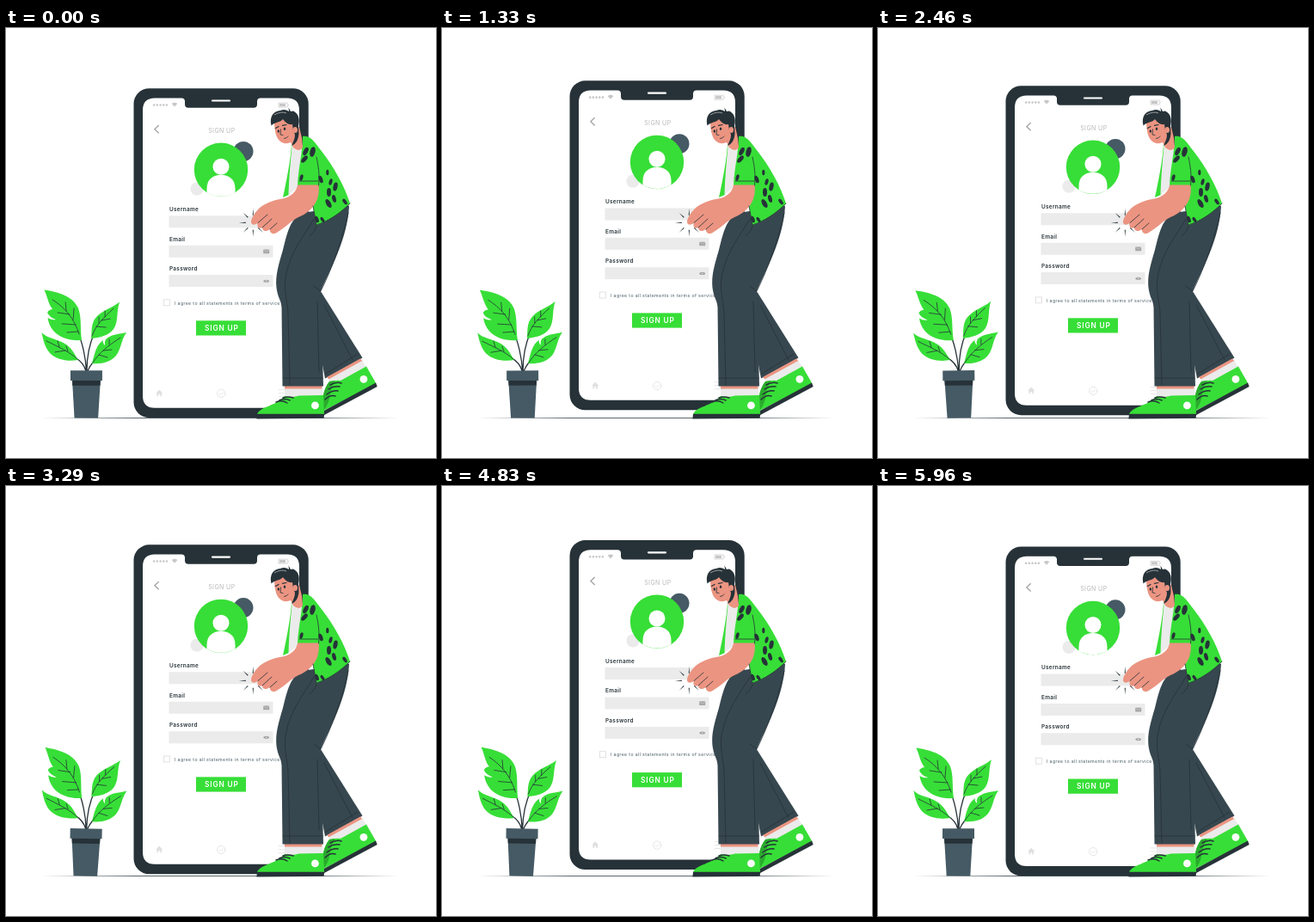
These frames come from a looping animation (500x500 px, 6000 ms). An HTML page:

```html
<!DOCTYPE html>
<html lang="en">
<head>
<meta charset="utf-8">
<title>Sign up</title>
<style>
  html, body { margin: 0; width: 100%; height: 100%; overflow: hidden; background: #fff; }
  svg { display: block; width: 100vw; height: 100vh; font-family: Inter, Lato, sans-serif; stroke-width: .8; }
  .green { fill: #37de37; }
  .dark { fill: #263238; }
  .slate { fill: #455a64; }
  .pants { fill: #37474f; }
  .skin { fill: #eb9481; }
  .pale { fill: #ebebeb; }
  .white { fill: #fff; }
  .line, .soft { fill: none; stroke: #263238; stroke-linecap: round; stroke-linejoin: round; }
  .soft { stroke: #e0e0e0; }
  .label { font-size: 6.4px; font-weight: 600; letter-spacing: .3px; fill: #263238; }
</style>
</head>
<body>
<svg viewBox="0 0 500 500">
  <path class="dark" d="M42 453.6L150 453.2H350L456 453.6L350 454H150Z"/>

  <g id="phone">
    <rect class="dark" x="148.5" y="70.5" width="203.2" height="383" rx="18"/>
    <path class="white" d="M173 81.7H204Q208 81.7 208 85.5V89Q208 93 212 93H288Q292 93 292 89V85.5Q292 81.7 296 81.7H327Q341 81.7 341 95.7V428Q341 442 327 442H173Q159 442 159 428V95.7Q159 81.7 173 81.7Z"/>
    <path d="M240 84.8H260" stroke="#fff" stroke-width="2.2" stroke-linecap="round"/>

    <g fill="#c7c7c7">
      <path d="M172.2 89.8h14.8" stroke="#c7c7c7" stroke-width="2.6" stroke-linecap="round" stroke-dasharray="0 3.68"/>
      <path d="M192.7 88.3Q196 85.6 199.3 88.3L196 91.9Z"/>
      <rect x="318" y="88.3" width="7" height="3.2"/>
      <path d="M317 87.4h10.2v5h-10.2zM328.6 89v1.6" fill="none" stroke="#c7c7c7" stroke-width=".7"/>
    </g>
    <path d="M177.7 113.4L172.9 118L177.7 122.6" fill="none" stroke="#a6a6a6" stroke-width="1.4"/>
    <text x="235.2" y="122.5" font-size="7" letter-spacing=".42" fill="#b8b8b8">SIGN UP</text>

    <circle class="slate" cx="276" cy="143.8" r="11.5"/>
    <circle class="pale" cx="222" cy="187.4" r="7.6"/>
    <circle class="green" cx="250" cy="165.1" r="31.2"/>
    <circle class="white" cx="250" cy="161.5" r="9.5"/>
    <path class="white" d="M233.5 191.7V187C233.5 176 241 171 250 171S266.5 176 266.5 187V191.7Q250 200.5 233.5 191.7Z"/>

    <g class="label">
      <text x="190" y="213.4">Username</text>
      <text x="190" y="247.9">Email</text>
      <text x="190" y="282.4">Password</text>
    </g>
    <path class="pale" d="M189.5 218.6h121v14h-121zM189.5 253h121v14h-121zM189.5 287.4h121v14h-121z"/>
    <rect x="299.2" y="257.8" width="7" height="4.7" rx=".5" fill="#a6a6a6"/>
    <path d="M299.5 258.4L302.7 260.6L305.9 258.4" fill="none" stroke="#ddd" stroke-width=".5"/>
    <ellipse cx="302.7" cy="294.6" rx="3.4" ry="1.6" fill="#a6a6a6"/>
    <circle cx="302.7" cy="294.6" r=".7" fill="#ebebeb"/>

    <rect x="183.4" y="316.2" width="7" height="7" fill="none" stroke="#d6d6d6" stroke-width=".7"/>
    <text x="196" y="321.9" font-size="5.2" letter-spacing=".38" fill="#455a64">I agree to all statements in terms of service</text>
    <rect class="green" x="221" y="340.6" width="58" height="17.2"/>
    <text class="white" x="231" y="352.3" font-size="8.3" font-weight="600" letter-spacing=".85">SIGN UP</text>

    <path d="M174.2 425L178.2 420.8L182.2 425H181V428.6H179.3V426.2H177.1V428.6H175.4V425Z" fill="#e0e0e0"/>
    <circle class="soft" cx="250.2" cy="425.2" r="4.7"/>
    <path class="soft" d="M248 425.2L249.8 426.9L252.7 424M317 421h8M317 425h8M317 429h8"/>
  </g>

  <g id="plant">
    <path class="line" stroke-width="1.3" d="M93.500 399C93 385 89 365 82 350M94 399C94 381 97 367 103 354M93 399C91 391 87 387 80 383M95 399C98 391 103 386 109 381"/>
    <g class="green">
      <path d="M44.3 304.6C61 307 78 312 84 326C88 337 86 350 88 363C74 364 62 360 55 352C51 347 49 342 48.5 337Q53 340 58 339Q50 336 48 331Q49 328 54 327C49 321 48 312 44.3 304.6Z"/>
      <path d="M41.5 354C47 361 60 361 70 368C78 374 80 380 84 386C72 388 59 386 51 378C45 371 43 362 41.5 354Z"/>
      <path d="M132 318.3C124 325 112 328 105 336C98 344 100 354 99 361C109 360 119 358 125 350C131 341 128 329 132 318.3Z"/>
      <path d="M140 354C132 356 122 356 116 362Q114 365 115 369Q112 366 113 363C105 368 103 379 100 390C111 391 121 389 128 381C134 373 134 362 140 354Z"/>
    </g>
    <path class="line" d="M54 316C68 325 79 337 85 356M70 329L69 319M78 339L79 326M74 333L60 331M81 345L65 344M84 353L71 354M47 364C61 371 73 376 83 385M62 371L60 364M72 376L70 370M69 375L57 377M125 326C113 337 104 346 100 358M115 336L115 329M108 343L108 336M111 340L121 338M105 347L116 348M133 360C119 369 108 378 101 389M120 368L120 362M113 375L123 374M108 380L118 383"/>
    <path class="slate" d="M77 408H110L107.3 453.5H79.7Z"/>
    <path class="dark" d="M77 409H110L109.6 415.7H77.4Z"/>
    <rect class="slate" x="75" y="398.3" width="37" height="11.7"/>
  </g>

  <g id="burst"></g>

  <g id="man">
    <path class="pants" d="M364 303L414.5 383.5L371 407.5L362 360Z"/>
    <path class="skin" d="M373 406L412 384.5L415 388L376 409Z"/>
    <path class="pale" d="M375 408.5L414 387L420 395L378 417Z"/>
    <path class="green" d="M376 411Q387 409 389 410L419 393.5L430.5 413.5L368.5 445.5C367 432 369 420 376 411Z"/>
    <path d="M376 411L383 410C374 421 380 433 369 445C367 431 369 420 376 411Z" fill="#2aab2d"/>
    <path class="dark" d="M368 446L430 412.5L431.7 417L370 450Z"/>
    <circle class="white" cx="415.9" cy="408.3" r="4.4"/>
    <path class="line" stroke-width="1.5" d="M377 415Q384 411 390 413M375 420Q381 416 388 417M373 426Q380 421 386 422M371 432Q377 426 383 428"/>

    <path class="skin" d="M324 415H367.5V420H324Z"/>
    <path class="pale" d="M324 419.500H368L369 430H324Z"/>
    <path class="green" d="M324 428Q333 430 341 427.5L369 427L370 449H292C296 440 313 440 324 428Z"/>
    <path class="dark" d="M292 448.7H370.2L369.6 453.8L291.3 454.5Z"/>
    <circle class="white" cx="359.4" cy="438.9" r="4.4"/>
    <path class="line" stroke-width="1.5" d="M322 430Q328 428 334 430M318 432.7Q325 430 330 433M314 435Q321 432 327 436"/>

    <path class="pants" d="M343 215C329 224 326 243 322 258C317 275 313 288 314.5 302C316 314 320 316 320.5 325L321.5 416.5H369L366 306C375 284 397 247 399 207L390 203L358 213Z"/>
    <path class="line" d="M358 222C348 240 330 260 325 290C323 305 327 318 328 331L330 415M398 215C390 252 376 286 366 306L358 300M362 318L364 400M322 407H368.5M370 322L403 386M372 402L409 379M363 224Q361 236 353 242"/>

    <path class="green" d="M332 136C331 153 326 179 322 197L329 194L334 145Z"/>
    <path class="pale" d="M332.5 138L345 137L341 184L328.500 194C329 174 331 153 332.5 138Z"/>
    <path class="green" d="M345 126C354 124 360 134 366 142C382 162 394 185 400 204C389 215 376 224 361 229.5L357 207L362 183H339C340 162 345 144 345 126Z"/>
    <path class="skin" d="M339 182.5C338 190 331 197 321 198.5C311 200 301 204 295 209C289 215 285 221 285 226C286 230 290 229 293 226.5C291 231 294 234 298 232C298 237 303 237 307 234C306 239 312 241 316 237C324 233 330 225 340 220C355 214 366 201 363.5 182.5Z"/>
    <path class="line" d="M293 226.5L304 217M298 232L309 222M307 234L315 227M363.5 183C365 171 363 159 361 150M341 178H363M357 207L361 229M361 229C376 224 389 215 400 204"/>
    <g id="spots" class="dark"></g>

    <path class="skin" d="M333 118L341 115L344 128L345 139Q341 145 334 139L331 133Z"/>
    <path class="skin" d="M312 108C312 116 313 125 317 130C322 136 331 135 335 130C340 123 340 111 334 103L319 102Z"/>
    <path class="dark" d="M308.5 113.5C306 103 311 96.5 319 96Q324 93.5 329 97L328.5 92.5L331 97L334 96.5C340 99 342 106 340 114L340.5 123C340 130 337 135 332 137C334 132 336 129 336 124L334 119L333 112C328 113 324 109 322 106C319 110 313 109 308.5 113.5Z"/>
    <ellipse class="skin" cx="336.3" cy="118.5" rx="2.7" ry="3.6"/>
    <ellipse class="dark" cx="316.8" cy="120" rx="1.2" ry="1.7"/>
    <ellipse class="dark" cx="324" cy="117.2" rx="1.2" ry="1.7"/>
    <path class="line" stroke-width="1.2" d="M313.5 116.5L317 114.5M321.5 113.3L326 112.5"/>
    <path class="line" d="M319.5 118L319 124L322 124.5M323.5 128.5Q326.5 128.5 328 126"/>
    <path d="M312 101Q320 96.500 326 99" fill="none" stroke="#fff" stroke-width=".5"/>
  </g>
</svg>
<script>
  const get = id => document.getElementById(id);

  // x, y, long radius, tilt
  const spots = [
    [356.5, 144, 6, 14], [348.5, 143.5, 5, 28], [347, 152.5, 5, 40],
    [373.8, 168, 3.2, 0], [366, 176, 4.5, -20], [377.5, 179, 3.8, 15],
    [383, 184.5, 5, 12], [375.5, 191, 5, 0], [381.5, 198.5, 4.5, -15],
    [375, 204, 5.5, -30], [394, 202, 3.8, -35], [343.5, 174, 3.8, 15],
    [361.5, 222.5, 4, -20], [368, 223, 3.5, -35]
  ];
  get("spots").innerHTML = spots.map(([x, y, r, tilt]) =>
    `<ellipse rx="${r * 0.5}" ry="${r}" transform="translate(${x} ${y}) rotate(${tilt})"/>`).join("");

  get("burst").innerHTML = [0, 45, 90, 135, 180, 225, 270, 315].map(a =>
    `<path class="dark" d="M-.6 -8.5L0 -16.5L.6 -8.5Z" transform="translate(287.3 226.3) rotate(${a})"/>`).join("");

  // Triangle wave: 0 at the start, 1 at a quarter, -1 at three quarters
  const swing = p => p < 0.25 ? 4 * p : p < 0.75 ? 2 - 4 * p : 4 * p - 4;
  const lead = 45;

  function draw(now) {
    const t = (now + lead) % 6000;
    const lift = 10 * (1 - Math.abs(1 - (t % 3000) / 1500));
    const tilt = swing((t % 1500) / 1500);
    get("phone").setAttribute("transform", `translate(0 ${-lift})`);
    get("plant").setAttribute("transform", `rotate(${tilt} 91 379)`);
    requestAnimationFrame(draw);
  }
  draw(0);
</script>
</body>
</html>
```
